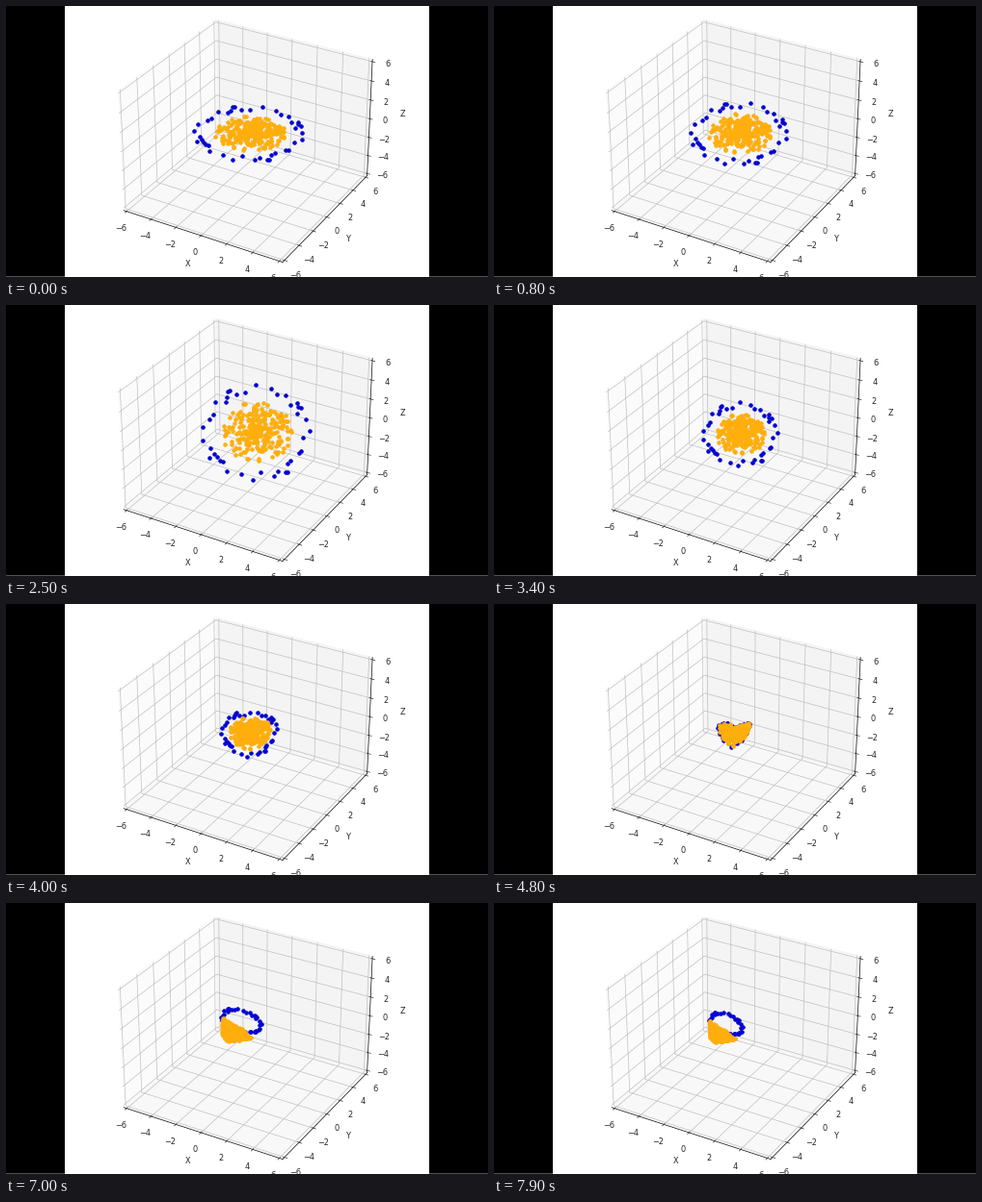
A matplotlib script for the animation above (8000 ms loop, 500x282 px).

```python
import numpy as np
import matplotlib.pyplot as plt
from matplotlib.animation import FuncAnimation
from matplotlib.patches import Rectangle

W, H, DPI = 500, 282, 60
BAR = 61
FRAMES, STEP = 80, 100
ORANGE, BLUE, GRID, INK = "#ffae0c", "#0404d0", "#bebebe", "#262626"

plt.rcParams.update({"font.size": 9.8, "grid.color": GRID, "text.color": INK,
                     "axes.labelcolor": INK, "xtick.color": INK,
                     "ytick.color": INK})
rng = np.random.default_rng(4)


def pack(x, y):
    return np.c_[x, y]


def make_ring(n=41):
    """Noisy unit circle whose points gather on four sides."""
    ang = 2 * np.pi * (np.arange(n) + rng.uniform(-0.4, 0.4, n)) / n
    ang -= 0.15 * np.sin(4 * ang + 2.4)
    rad = rng.uniform(0.86, 1.06, n)
    return pack(rad * np.cos(ang), rad * np.sin(ang))


def make_disc(n=270):
    """Unit disc, denser towards its centre."""
    ang, rad = rng.uniform(0, 2 * np.pi, n), rng.random(n)
    return pack(rad * np.cos(ang), rad * np.sin(ang))


# Each pose maps unit coordinates (y down) to pixels
def flat(p, size):
    c, s = np.cos(0.25), np.sin(0.25)
    return size * (p @ [[c, s], [-s, c]]) * [55, 27.5] + [253, 132.5]


def turned(p, size):
    x, y = (size * p * [54, 48]).T
    return pack(257 + 0.73 * x - 0.2 * y, 132.5 + 0.1 * x + 0.73 * y)


def wide(p, size, k=1):
    return k * size * p * [54, 48] + [260, 132]


def narrow(p, size):
    return size * p * [37.5, 32] + [255.5, 134]


def wedge(p, size):
    a, b = p.T
    return pack(249 + 16 * a - 2 * b,
                136 + np.where(b < 0, 8, 13) * b - 9 * abs(a))


def small_ring(a, b):
    return pack(238 + 12 * a + 11 * np.maximum(a - 0.1, 0), 130 + 6 * b)


def small_disc(a, b):
    return pack(236 + 10 * a - 4 * np.maximum(b, 0),
                134 + a + np.where(b < 0, 4, 11) * b - 2 * abs(a * b))


def corner_ring(a, b):
    return pack(241 + 17 * a + 3 * b, np.minimum(126 + 12 * b + 3 * a, 136))


def corner_disc(a, b):
    u = np.maximum(0, 0.3 + 0.6 * a + 0.3 * b)
    v = np.maximum(0, 0.3 - 0.3 * a - 0.6 * b)
    return pack(224 + 27 * u, 146 - 24 * v - 5 * u)


TIMES = [0, 1700, 2500, 2750, 3400, 4800, 6100, 7200, 7900]
APEX = np.array([224, 146])


def poses(p, size, small, corner):
    last = corner(*p.T)
    return np.array([flat(p, size), turned(p, size), wide(p, size),
                     wide(p, size, 1.05), narrow(p, size), wedge(p, size),
                     small(*p.T), APEX + 1.22 * (last - APEX), last])


ring_poses = poses(make_ring(), 1, small_ring, corner_ring)
disc_poses = poses(make_disc(), 0.67, small_disc, corner_disc)


def blend(keys, t):
    i = min(np.searchsorted(TIMES, t, side="right") - 1, len(TIMES) - 2)
    f = (t - TIMES[i]) / (TIMES[i + 1] - TIMES[i])
    return keys[i] + f * (keys[i + 1] - keys[i])


fig = plt.figure(figsize=(W / DPI, H / DPI), dpi=DPI, facecolor="white")

side, left, top = 293.6, 99.9, -8.5
ax = fig.add_axes([left / W, 1 - (top + side) / H, side / W, side / H],
                  projection="3d")
ticks = range(-6, 7, 2)
lim = (-6.25, 6.25)
ax.set(xlim=lim, ylim=lim, zlim=lim, xticks=ticks, yticks=ticks, zticks=ticks,
       xlabel="X", ylabel="Y", zlabel="Z")
ax.view_init(elev=30, azim=-60)
for axis, shade in ((ax.xaxis, 0.985), (ax.yaxis, 0.957), (ax.zaxis, 0.972)):
    axis.set_pane_color((shade, shade, shade, 1))

stage = fig.add_axes([0, 0, 1, 1])
stage.set(xlim=(0, W), ylim=(H, 0))
stage.axis("off")
for x in (0, W - BAR):
    stage.add_patch(Rectangle((x, 0), BAR, H, color="#505050", lw=0))
    stage.add_patch(Rectangle((x, 0), BAR, H - 1, color="black", lw=0))
outer = stage.scatter(*ring_poses[0].T, s=19, color=BLUE, zorder=3)
inner = stage.scatter(*disc_poses[0].T, s=19, color=ORANGE, zorder=4)


def update(i):
    t = i * STEP
    outer.set_offsets(blend(ring_poses, t))
    inner.set_offsets(blend(disc_poses, t))
    return outer, inner


anim = FuncAnimation(fig, update, frames=FRAMES, interval=STEP,
                     repeat=True, repeat_delay=0, blit=False)
plt.show()
```
